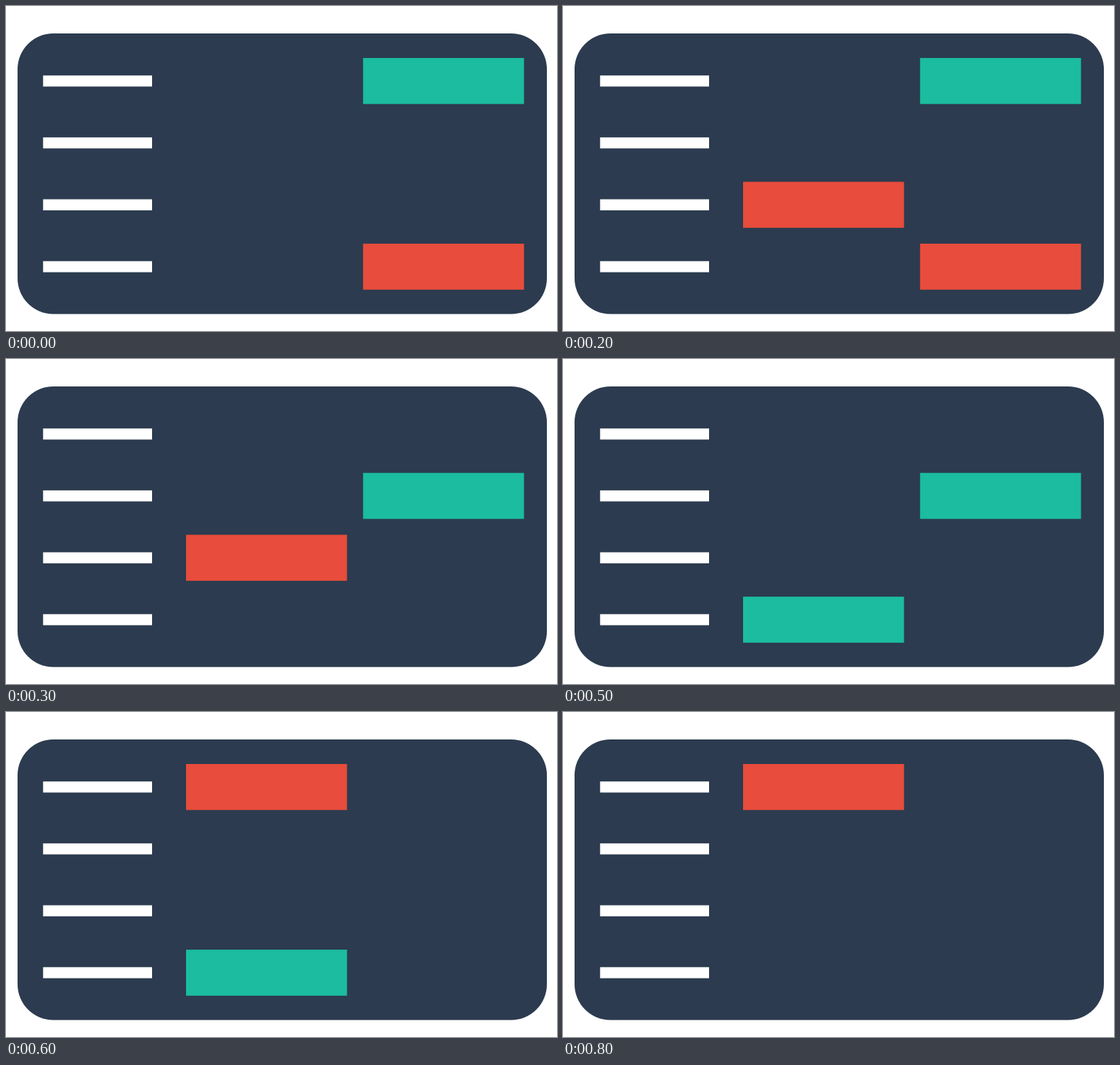
Write an HTML page that moves like this. It is 762 px wide and 450 px high and loops after 0.9 s.

```html
<!DOCTYPE html>
<html lang="en">
<head>
<meta charset="utf-8">
<title>Blinking tiles</title>
<style>
  html, body { margin: 0; width: 100%; height: 100%; overflow: hidden; background: #fff; }
  svg { display: block; width: 100%; height: 100%; }
</style>
</head>
<body>
<svg id="stage" viewBox="0 0 762 450">
  <rect x="16" y="38" width="732" height="388.6" rx="49.5" fill="#2c3b4f"/>
</svg>
<script>
const LOOP = 900, STEP = 100, ROW = 85.7;
const GREEN = '#1bbc9f', RED = '#e74c3c';
const stage = document.getElementById('stage');

function rect(x, y, width, height, fill) {
  const el = document.createElementNS('http://www.w3.org/2000/svg', 'rect');
  for (const [k, v] of Object.entries({ x, y, width, height, fill })) el.setAttribute(k, v);
  return stage.appendChild(el);
}

for (let row = 0; row < 4; row++) rect(51.3, 96.2 + row * ROW, 150.7, 15.3, '#fff');

// Each tile stays lit for three steps from its start.
const HOLD = 3;
const tiles = [
  { col: 1, row: 0, fill: GREEN, start: 0 },
  { col: 1, row: 3, fill: RED, start: 0 },
  { col: 0, row: 2, fill: RED, start: 2 },
  { col: 1, row: 1, fill: GREEN, start: 3 },
  { col: 0, row: 3, fill: GREEN, start: 5 },
  { col: 0, row: 0, fill: RED, start: 6 }
];
for (const t of tiles) t.el = rect(249 + t.col * 244.8, 72 + t.row * ROW, 222.6, 63.7, t.fill);

function draw(ms) {
  const step = Math.floor((ms % LOOP) / STEP);
  for (const t of tiles) {
    const lit = step >= t.start && step < t.start + HOLD;
    t.el.setAttribute('visibility', lit ? 'visible' : 'hidden');
  }
}

let origin;
function tick(now) {
  origin ??= now;
  draw(now - origin);
  requestAnimationFrame(tick);
}
draw(0);
requestAnimationFrame(tick);
</script>
</body>
</html>
```
